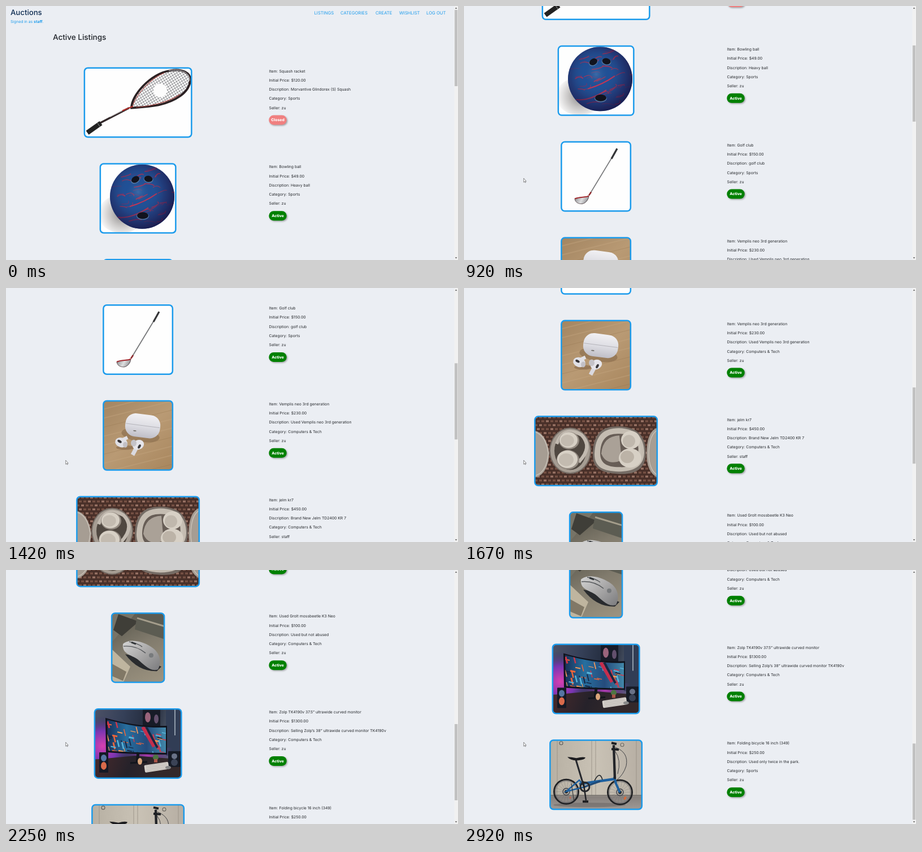
An HTML page with a canvas that plays this animation: 800 by 450 pixels, repeating every 3010 ms.

```html
<!DOCTYPE html>
<html lang="en">
<head>
<meta charset="utf-8">
<title>Auctions</title>
<style>
html, body { margin: 0; width: 100%; height: 100%; overflow: hidden; background: #ebeef3; }
canvas { display: block; width: 800px; height: 450px; }
</style>
</head>
<body>
<canvas id="stage" width="800" height="450"></canvas>
<script>
const ctx = document.getElementById('stage').getContext('2d');
const LOOP = 3010, ROW_TOP = 108.5, ROW_STEP = 169.75, CARD_H = 125, CENTER = 233.6;
const BLUE = '#1b9bec';

// Scroll keys: step, offset, speed per step
const KEYS = [[0, 0, 5], [7, 92.5, 19], [11, 208.4, 31.5], [17, 419, 41],
              [24, 758.5, 43], [29, 938.5, 19], [35, 996.5, 2]];

// ---------- drawing helpers ----------
function text(str, x, y, size, color, weight = 400, align = 'left') {
  ctx.font = `${weight} ${size}px Inter, sans-serif`;
  ctx.textAlign = align;
  ctx.fillStyle = color;
  ctx.fillText(str, x, y);
}
function rect(x, y, w, h, color) {
  ctx.fillStyle = color;
  ctx.fillRect(x, y, w, h);
}
function rounded(x, y, w, h, r, color) {
  ctx.beginPath();
  ctx.roundRect(x, y, w, h, r);
  ctx.fillStyle = color;
  ctx.fill();
}
function oval(x, y, rx, ry, color, turn = 0) {
  ctx.beginPath();
  ctx.ellipse(x, y, rx, ry, turn, 0, 7);
  ctx.fillStyle = color;
  ctx.fill();
}
function ring(x, y, r, color, width) {
  ctx.beginPath();
  ctx.arc(x, y, r, 0, 7);
  ctx.strokeStyle = color;
  ctx.lineWidth = width;
  ctx.stroke();
}
function line(x1, y1, x2, y2, color, width) {
  ctx.beginPath();
  ctx.moveTo(x1, y1);
  ctx.lineTo(x2, y2);
  ctx.strokeStyle = color;
  ctx.lineWidth = width;
  ctx.stroke();
}
function fillPath(d, color) {
  ctx.fillStyle = color;
  ctx.fill(new Path2D(d));
}
function strokePath(d, color, width) {
  ctx.strokeStyle = color;
  ctx.lineWidth = width;
  ctx.stroke(new Path2D(d));
}
function fade(x1, y1, x2, y2, ...colors) {
  const g = ctx.createLinearGradient(x1, y1, x2, y2);
  colors.forEach((c, i) => g.addColorStop(i / (colors.length - 1), c));
  return g;
}
function glow(x, y, r, ...colors) {
  const g = ctx.createRadialGradient(x, y, 0, x, y, r);
  colors.forEach((c, i) => g.addColorStop(i / (colors.length - 1), c));
  return g;
}
function turned(x, y, angle, draw) {
  ctx.save();
  ctx.translate(x, y);
  ctx.rotate(angle);
  draw();
  ctx.restore();
}
function clipped(path, draw) {
  ctx.save();
  ctx.clip(path);
  draw();
  ctx.restore();
}
function randomizer(seed) {
  return () => (seed = (seed * 16807) % 2147483647) / 2147483647;
}

// ---------- pictures; y counts from the top of the card ----------
function racket() {
  const d = 'M222 72C222 50 255 12 290 6C312 2 328 10 326 24C324 45 300 60 270 67C250 71 232 71 222 72Z';
  clipped(new Path2D(d), () => turned(276, 38, -0.55, () => {
    for (let k = -66; k <= 66; k += 4.3) {
      line(k, -45, k, 45, '#55565a', 0.6);
      line(-70, k, 70, k, '#55565a', 0.6);
    }
  }));
  oval(273, 41, 12, 12, '#fcfcfc');
  strokePath(d, '#2a2022', 3.8);
  strokePath('M225 66C232 48 255 20 280 10M230 71C256 69 288 62 308 48', '#a8403c', 1.1);
  strokePath('M288 6C312 2 326 10 325 24', '#d8d8da', 1);
  line(167, 98.5, 218, 72, '#33282a', 3.6);
  line(206, 77, 225, 69, '#b5302c', 2.4);
  line(184, 88, 206, 77, '#d5d0d0', 1);
  line(144, 116, 168, 99, '#222', 8.5);
  line(162, 99, 166, 105, '#999', 1);
}

function bowlingBall() {
  oval(205, 90, 42, 34, glow(205, 90, 42, '#8c8a8a', '#c9c7c6', '#ffffff'));
  const ball = new Path2D();
  ball.arc(241, 59.5, 57, 0, 7);
  clipped(ball, () => {
    rect(180, 0, 125, 125, '#205096');
    const rnd = randomizer(71);
    for (let i = 0; i < 46; i++) {
      const x = 183 + rnd() * 112, y = 8 + rnd() * 104;
      strokePath(`M${x} ${y}q${6 + rnd() * 12} ${rnd() * 10 - 9} ${8 + rnd() * 16} ${rnd() * 14 - 10}`,
        i % 3 ? '#a83358' : '#5b3d78', 0.6 + rnd() * 1.4);
    }
    strokePath('M219 77Q246 69 267 54M198 96Q222 99 252 79M264 25q4-8 9-6', '#c93452', 2);
    rect(180, 0, 125, 125, glow(234, 51, 68, '#6f9cca55', '#29528400', '#241d5066', '#160f3dcc'));
  });
  for (const [x, y, rx, ry, a] of [[229, 29, 7.5, 5.5, -0.5], [252, 28, 7.5, 5.5, 0.2], [242, 93, 10, 6, 0]]) {
    oval(x, y + 1, rx + 1, ry + 0.6, '#5275a1', a);
    oval(x, y, rx, ry, '#11131e', a);
  }
}

function golfClub() {
  line(269, 17, 223, 93, '#77787a', 1.8);
  line(271, 13, 261, 31, '#353638', 3.2);
  line(225, 90, 221, 96, '#8f2b2e', 2.6);
  fillPath('M196 101C205 98 214 99 221 97C221 104 216 110 209 111C201 111 196 107 196 101Z',
    fade(197, 100, 218, 111, '#8f9093', '#dedfe0', '#85868a'));
  strokePath('M196 102C204 98 214 100 221 97', '#a42b30', 2);
  strokePath('M196 102C197 109 203 111 209 111C215 110 220 104 221 97', '#57474a', 0.9);
}

function earbuds() {
  rect(171, 0, 125, 125, fade(180, 0, 285, 125, '#a48662', '#b99a74', '#a9875e'));
  for (let k = 0; k < 15; k++) {
    line(168, 8 + k * 16 - 55, 300, k * 16 - 80, k % 3 ? '#c3a67f66' : '#8a6a484d', k % 3 ? 2 : 1);
  }
  oval(238, 62, 34, 12, '#6e533766', 0.15);
  turned(242, 46, 0.13, () => {
    rounded(-31, -21, 62, 41, 18, fade(0, -21, 0, 21, '#f1f0f3', '#dddde3', '#bebdc6'));
    line(-30, -1, 30, -1, '#b1b0b7', 0.9);
    oval(-13, 10, 3, 1, '#77736f');
  });
  oval(211, 84, 16, 4, '#694c3266');
  line(203, 72, 215, 66, '#e1e0e5', 6);
  oval(204, 75, 11, 8.5, '#e0e0e6', 0.3);
  oval(201, 73, 4, 2.2, '#343236', 0.5);
  oval(211, 79, 4, 5, '#c2c0c6');
  line(232, 82, 224, 97, '#dad9df', 7);
  oval(234, 79, 10.5, 8.5, '#e6e5ea', -0.4);
  oval(226, 76, 5, 6, '#c5c3c8');
  oval(236, 82, 2.2, 4, '#39373a', 0.5);
}

function headphones() {
  rect(124, 0, 220, 125, '#493029');
  for (let row = 0; row < 18; row++) {
    for (let col = 0; col < 28; col++) {
      rect(125 + col * 8 + (row % 2) * 4, 1 + row * 7, 5, 3.4, (row + col) % 3 ? '#765144' : '#987264');
    }
  }
  const shell = '#a69d93', edge = '#756c65', pale = '#d7d0c5';
  fillPath('M124 26Q145 30 151 66Q149 102 128 109H124Z', shell);
  strokePath('M126 29Q145 35 149 66Q147 99 127 106', '#c7bfb5', 1.5);
  oval(188, 62, 37, 41, edge);
  oval(188, 62, 35, 39, shell);
  oval(188, 62, 28, 34, '#504841');
  strokePath('M164 50Q176 17 208 34Q229 55 203 82', '#c2bab0', 6);
  for (const [x, y, r] of [[186, 44, 18], [184, 78, 20]]) {
    oval(x, y, r, r * 0.86, '#948b82');
    oval(x - 1, y - 1, r - 2, r * 0.78, pale);
    oval(x - 3, y, r * 0.65, r * 0.57, '#c3bbb0');
  }
  fillPath('M228 70C228 34 242 18 274 19C308 20 322 36 322 67C321 96 302 105 272 103C244 101 228 94 228 70Z', edge);
  fillPath('M231 68C232 36 246 22 274 22C304 23 319 38 319 66C318 90 300 99 273 99C247 98 231 92 231 68Z', '#c4bcb1');
  fillPath('M241 66C242 42 252 31 275 32C302 32 312 43 312 66C311 86 296 92 275 91C252 91 241 84 241 66Z', '#675d56');
  fillPath('M243 67Q246 36 275 35L279 79Q252 90 243 67Z', '#aaa197');
  strokePath('M277 76Q304 102 311 65Q313 39 293 29', '#c8c1b6', 5);
  oval(295, 43, 17, 16, pale);
  oval(292, 45, 11, 11, '#c0b8ad');
  oval(294, 75, 20, 17, pale);
  oval(289, 73, 12, 11, '#bcb3a7');
  fillPath('M344 21Q324 25 323 66Q323 102 344 110Z', shell);
  strokePath('M344 25Q328 31 327 66Q327 98 344 106', '#c8c0b6', 1.5);
}

function computerMouse() {
  rect(186, 0, 96, 125, fade(195, 0, 260, 125, '#555348', '#817b6d', '#9b927f'));
  fillPath('M186 0H230L196 43L186 54Z', '#777467');
  fillPath('M199 3L235 16L205 42L190 31Z', '#3f3e38');
  fillPath('M233 0H282V48L228 30Z', '#5c5c52');
  line(232, 10, 282, 25, '#a49d8b', 3);
  fillPath('M186 64L220 96L208 123H186Z', '#bfb59f');
  fillPath('M186 90L213 105L207 121L186 112Z', '#817866');
  fillPath('M211 74Q234 105 267 104L275 96L239 79Z', '#292b2e');
  fillPath('M207 56C216 47 239 49 257 61C273 71 276 88 269 101C255 106 243 91 233 83C222 75 205 74 207 56Z',
    fade(213, 50, 262, 104, '#d0d0d0', '#aaa9a9', '#818183'));
  strokePath('M208 60Q230 58 247 72M218 52Q234 55 241 61', '#54575a', 1.4);
  line(222, 53, 230, 56, '#303437', 3);
  oval(257, 76, 4, 4, '#777a7c');
}

function monitor() {
  rect(156, 0, 156, 125, fade(156, 0, 312, 30, '#4d5267', '#354058', '#202838', '#6b7588'));
  rect(156, 15, 70, 75, glow(171, 67, 54, '#d740b0', '#7b35b2', '#39366600'));
  rect(242, 0, 31, 32, '#171b27');
  oval(251, 16, 5, 9, '#9a647b');
  oval(266, 19, 4, 8, '#63506d');
  rect(283, 0, 29, 84, '#313d55');
  line(299, 2, 299, 48, '#8f9baa', 2);
  rect(200, 70, 100, 20, glow(250, 80, 45, '#b53bb5', '#6936a000'));
  fillPath('M176 17Q233 34 285 31V82Q232 82 177 78Z', '#10131d');
  const screen = new Path2D('M179 20Q234 36 283 34V79Q232 79 180 75Z');
  clipped(screen, () => {
    rect(176, 16, 110, 66, fade(178, 0, 284, 0, '#182f56', '#276f9f', '#254b7c', '#4389aa'));
    const rnd = randomizer(39);
    const tones = ['#ee653a', '#d73648', '#58b6db', '#172744', '#ff9b56'];
    for (let i = 0; i < 54; i++) {
      const x = 178 + rnd() * 104, y = 20 + rnd() * 58;
      line(x, y, x + (i % 2 ? 3 : 9), y + (i % 2 ? 12 : 2), tones[i % 5], 1 + rnd() * 2);
    }
    line(242, 33, 262, 68, '#c52e4d', 6);
    line(248, 33, 268, 70, '#182743', 4);
  });
  fillPath('M156 91L228 84L312 91V125H156Z', fade(165, 85, 270, 125, '#44292c', '#26222a', '#33282a'));
  line(234, 78, 232, 96, '#12151c', 5);
  line(220, 97, 250, 95, '#12151c', 3);
  rounded(165, 78, 16, 36, 1, '#151925');
  oval(173, 88, 5, 6, '#5675a2');
  oval(173, 102, 5, 7, '#d96a4b');
  rounded(287, 76, 22, 28, 1, '#161b26');
  oval(298, 85, 5, 5, '#697287');
  oval(298, 96, 6, 6, '#3b4356');
  oval(265, 87, 5, 5, '#4e7543');
  rect(262, 90, 6, 6, '#a95548');
  oval(237, 94, 4, 6, '#d9a47a');
  turned(266, 104, -0.15, () => {
    rounded(-21, -6, 43, 13, 2, '#d5d0ca');
    for (let k = -4; k < 6; k += 3) line(-18, k, 19, k, '#aaa6a2', 0.6);
  });
  oval(287, 105, 5, 3, '#888');
}

function bicycle() {
  rect(151, 0, 165, 102, fade(151, 0, 316, 0, '#b7b0a3', '#c9c2b5', '#b6aea3'));
  rect(151, 100, 165, 25, fade(0, 100, 0, 125, '#857f7b', '#a09a96'));
  for (const x of [165, 226, 233, 305]) line(x, 2, x, 100, '#958e83', 0.8);
  line(151, 99, 316, 99, '#716d69', 1.4);
  ring(172, 6.5, 3, '#5e5c59', 1.1);
  ring(280, 9.5, 3, '#6b6862', 1.1);
  oval(222, 116, 64, 4, '#55505066');
  for (const [x, y] of [[181, 92.5], [276, 93.5]]) {
    for (let k = 0; k < 9; k++) {
      const c = 20 * Math.cos(k * Math.PI / 9), s = 20 * Math.sin(k * Math.PI / 9);
      line(x - c, y - s, x + c, y + s, '#66656599', 0.5);
    }
    ring(x, y, 21.5, '#222326', 3);
    ring(x, y, 18.8, '#64646a', 0.8);
    ring(x, y, 6, '#42434a', 1.4);
    oval(x, y, 3, 3, '#222');
  }
  const paint = '#1d609f';
  strokePath('M181 92L204 72L214 84ZM204 72L214 84', paint, 2.5);
  line(204, 79, 266, 70, paint, 4.5);
  line(213, 84, 241, 74, '#204a77', 3);
  strokePath('M266 66L269 78L276 94', paint, 4);
  line(198, 36, 213, 86, '#26282d', 3);
  fillPath('M183 31Q190 31 199 33Q210 30 215 32Q214 36 202 37Q189 38 183 31Z', '#1d1d20');
  line(265, 10, 267, 70, '#222428', 4.3);
  strokePath('M261 6L270 8M261 17L274 18', '#1d1f22', 4);
  strokePath('M268 14Q292 23 287 47Q282 63 270 72M267 20Q279 36 272 61', '#333539', 0.9);
  strokePath('M231 73Q240 55 245 71', '#292c30', 1.7);
  ring(214, 84, 8, '#27292e', 3);
  line(211, 74, 216, 108, '#202226', 2.5);
  line(210, 110, 220, 110, '#1d1d20', 4);
  line(190, 78, 195, 111, '#34363a', 1.2);
  oval(285, 104, 2, 3, '#d46c3e', 0.5);
  oval(188, 103, 1.5, 2, '#bf6851');
}

const SPORTS = 'Sports', TECH = 'Computers & Tech';
const LISTINGS = [
  { width: 192, draw: racket, item: 'Squash racket', price: 120, about: 'Morvantive Glindorex (S) Squash', kind: SPORTS, closed: true },
  { width: 136, draw: bowlingBall, item: 'Bowling ball', price: 49, about: 'Heavy ball', kind: SPORTS },
  { width: 125, draw: golfClub, item: 'Golf club', price: 150, about: 'golf club', kind: SPORTS },
  { width: 125, draw: earbuds, item: 'Vemplis neo 3rd generation', price: 230, about: 'Used Vemplis neo 3rd generation', kind: TECH },
  { width: 219, draw: headphones, item: 'jelm kr7', price: 450, about: 'Brand New Jelm TD2400 KR 7', kind: TECH, seller: 'staff' },
  { width: 95.5, draw: computerMouse, item: 'Used Grolt mossbeetle K3 Neo', price: 100, about: 'Used but not abused', kind: TECH },
  { width: 156, draw: monitor, item: 'Zolp TK4190v 37.5” ultrawide curved monitor', price: 1300, about: 'Selling Zolp’s 38” ultrawide curved monitor TK4190v', kind: TECH },
  { width: 165, draw: bicycle, item: 'Folding bicycle 16 inch (349)', price: 250, about: 'Used only twice in the park.', kind: SPORTS }
];

// ---------- page ----------
function drawHeader() {
  text('Auctions', 8, 16.3, 13.2, '#0d2b50', 500);
  text('Signed in as ', 8, 29.6, 6.8, BLUE);
  const nameX = 8 + ctx.measureText('Signed in as ').width;
  text('staff', nameX, 29.6, 6.8, BLUE, 700);
  const dotX = nameX + ctx.measureText('staff').width;
  text('.', dotX, 29.6, 6.8, BLUE);
  const links = { LISTINGS: 545.5, CATEGORIES: 592, CREATE: 654, WISHLIST: 696, 'LOG OUT': 744 };
  for (const [label, x] of Object.entries(links)) text(label, x, 14.8, 7.7, BLUE);
  text('Active Listings', 83, 60, 13.5, '#1f2329', 500);
}

function drawButton(closed) {
  ctx.save();
  ctx.shadowColor = '#00000055';
  ctx.shadowBlur = 3;
  ctx.shadowOffsetX = ctx.shadowOffsetY = 1.5;
  rounded(465.3, 85, 31.4, 17, 8.3, closed ? '#f08080' : '#008000');
  ctx.restore();
  text(closed ? 'Closed' : 'Active', 481, 95.8, 6.8, '#fff', 800, 'center');
}

function drawListing({ width, draw, item, price, about, kind, closed, seller = 'zu' }) {
  const x = CENTER - width / 2;
  const photo = new Path2D();
  photo.roundRect(x + 1, 1, width - 2, CARD_H - 2, 6);
  clipped(photo, () => {
    rect(x, 0, width, CARD_H, '#fefefe');
    draw();
  });
  ctx.beginPath();
  ctx.roundRect(x + 1.25, 1.25, width - 2.5, CARD_H - 2.5, 6);
  ctx.strokeStyle = BLUE;
  ctx.lineWidth = 2.5;
  ctx.stroke();
  const lines = [`Item: ${item}`, `Initial Price: $${price}.00`, `Discription: ${about}`,
                 `Category: ${kind}`, `Seller: ${seller}`];
  lines.forEach((str, i) => text(str, 465.5, 9.2 + i * 16.25, 6.83, '#24272b'));
  drawButton(closed);
}

function drawScrollbar(scroll) {
  rect(793.3, 0, 6.7, 450, '#f1f1f1');
  rect(794, 7 + scroll * 0.3015, 5.2, 135, '#c1c1c1');
  fillPath('M794.8 4.8L796.6 2.6L798.4 4.8Z', '#555');
  fillPath('M794.8 445.2L796.6 447.4L798.4 445.2Z', '#555');
}

function drawPointer() {
  const d = 'M105.7 305.2V312.3L107.3 310.8L108.4 313L109.4 312.5L108.4 310.4H110.2Z';
  fillPath(d, '#fff');
  strokePath(d, '#444', 0.6);
}

// ---------- time ----------
function stepAt(ms) {
  const rest = ms % 250;
  const step = 3 * Math.floor(ms / 250) + (rest >= 80) + (rest >= 170);
  return Math.min(35, step);
}

function scrollAt(step) {
  const i = Math.min(KEYS.length - 2, KEYS.findLastIndex(k => k[0] <= step));
  const [s0, y0, v0] = KEYS[i], [s1, y1, v1] = KEYS[i + 1];
  const span = s1 - s0, u = (step - s0) / span, w = 1 - u;
  return w * w * (1 + 2 * u) * y0 + u * u * (3 - 2 * u) * y1 + u * w * span * (w * v0 - u * v1);
}

function render(step) {
  const scroll = scrollAt(step);
  ctx.textRendering = 'geometricPrecision';
  rect(0, 0, 800, 450, '#ebeef3');
  ctx.save();
  ctx.translate(0, -scroll);
  drawHeader();
  LISTINGS.forEach((listing, i) => {
    const top = ROW_TOP + i * ROW_STEP;
    if (top - scroll > 452 || top + CARD_H < scroll) return;
    ctx.save();
    ctx.translate(0, top);
    drawListing(listing);
    ctx.restore();
  });
  ctx.restore();
  drawScrollbar(scroll);
  if (step > 0) drawPointer();
}

const start = performance.now();
function tick() {
  render(stepAt((performance.now() - start) % LOOP));
  requestAnimationFrame(tick);
}
tick();
</script>
</body>
</html>
```
